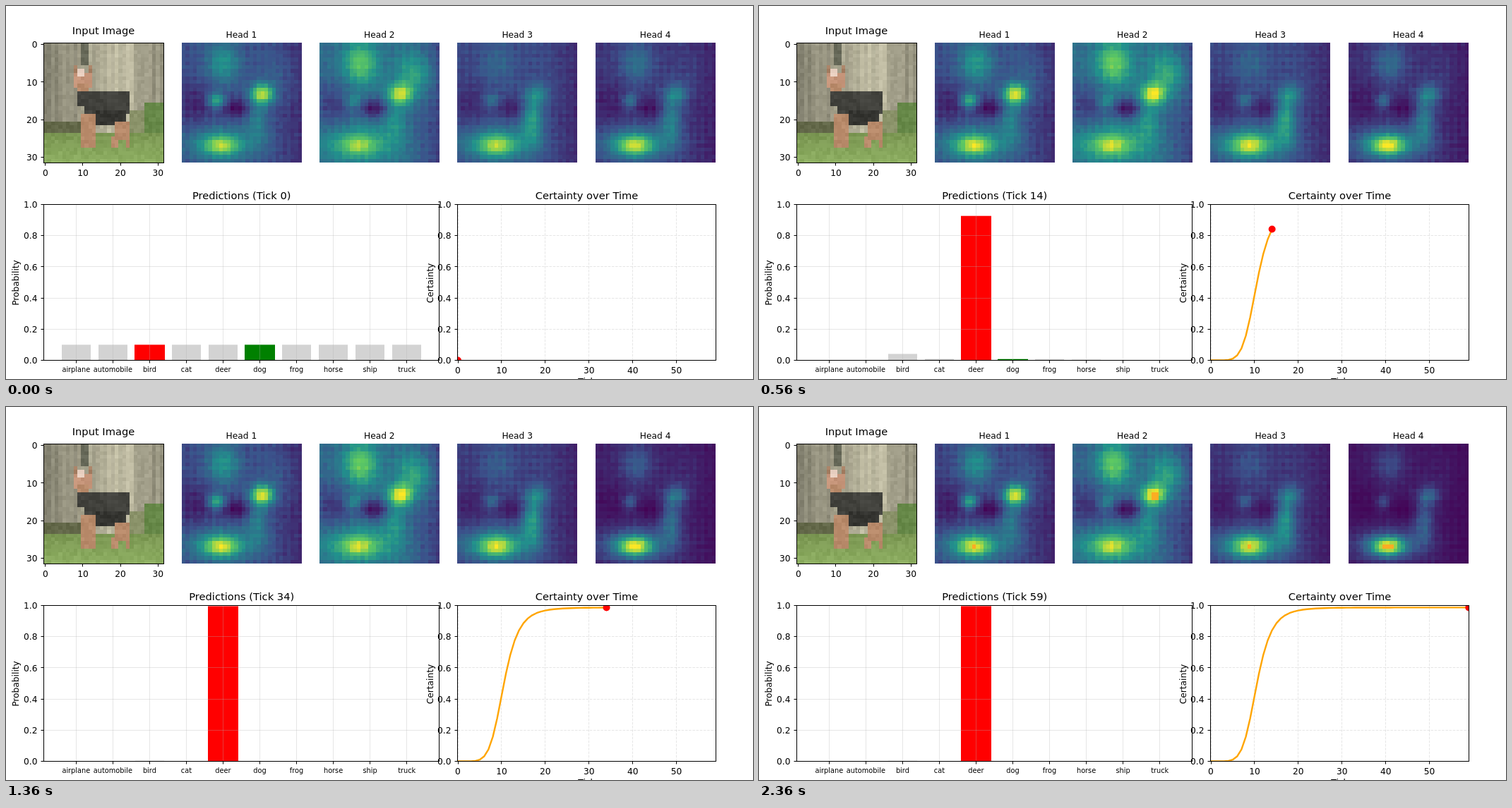
An HTML page with a canvas for the animation above (2400 ms loop, 1058x529 px).

```html
<!DOCTYPE html>
<html lang="en">
<head>
<meta charset="utf-8">
<title>Attention heads and certainty</title>
<style>
html, body { margin: 0; width: 100%; height: 100%; overflow: hidden; background: #fff; }
canvas { display: block; width: 100%; height: 100%; }
</style>
</head>
<body>
<canvas id="stage" width="1058" height="529"></canvas>
<script>
const ctx = document.getElementById('stage').getContext('2d');
const TICKS = 60, TICK_MS = 40, N = 32, CELL = 170 / N;
const PT = 1.2222;
const TOP = 281.5, BOTTOM = 502.5;
const GRID = 'rgba(176,176,176,.32)';

const clamp = (v, lo = 0, hi = 1) => Math.min(hi, Math.max(lo, v));
const mix = (a, b, k) => a + (b - a) * k;
const mixColor = (a, b, k) => a.map((c, i) => mix(c, b[i], k));
const css = rgb => `rgb(${rgb.map(Math.round)})`;
const bell = (d, spread) => Math.exp(-(d * d) / (2 * spread * spread));
const hash = (x, y, seed) => {
  const s = Math.sin(x * 127.1 + y * 311.7 + seed * 74.7) * 43758.5453;
  return s - Math.floor(s);
};
const range = n => Array.from({ length: n }, (_, i) => i);

// Certainty saturates along a Hill curve.
const certainty = t => {
  const odds = (t / 10.5) ** 6.1;
  return .987 * odds / (1 + odds);
};

// Probabilities: one set of logits, sharpened until the entropy fits the certainty.
const logits = {
  airplane: -.9, automobile: -1.15, bird: -.46, cat: -.68, deer: 0,
  dog: -.7, frog: -.72, horse: -.78, ship: -1.2, truck: -1.2
};
const classes = Object.keys(logits);
const truth = 'dog';

function softmax(sharpness) {
  const e = classes.map(name => Math.exp(logits[name] * sharpness));
  const sum = e.reduce((a, b) => a + b);
  return e.map(v => v / sum);
}
const entropy = p => -p.reduce((s, v) => s + (v > 0 ? v * Math.log(v) : 0), 0) / Math.log(p.length);
const probabilities = range(TICKS).map(t => {
  let lo = 0, hi = 40;
  for (let i = 0; i < 30; i++) {
    const mid = (lo + hi) / 2;
    if (1 - entropy(softmax(mid)) < certainty(t)) lo = mid; else hi = mid;
  }
  return softmax(lo);
});

const viridis = [[68, 1, 84], [59, 82, 139], [33, 145, 140], [94, 201, 98], [253, 231, 37]];
function colormap(v) {
  const k = clamp(v) * 4, i = Math.min(3, Math.floor(k));
  return mixColor(viridis[i], viridis[i + 1], k - i);
}

// Places in the picture that the heads share: centre x, y and spread x, y.
const landmarks = {
  crown: [10.5, 5, 3.2, 4],
  chest: [8.7, 15, 1.5, 1.4],
  rump: [21, 13.2, 2.1, 1.8],
  tail: [25, 8, 3.5, 4.5],
  hind: [19.5, 20, 2, 4.5],
  paws: [10, 27, 3, 1.8],
  ground: [10, 26.5, 7, 3.2],
  belly: [14, 17, 2.6, 1.8],
  fence: [3, 16, 3.5, 4]
};
const heads = [
  { base: .24, gamma: 1.17, crown: .27, chest: .4, rump: .62, tail: .08, hind: .17, paws: .4, ground: .28, belly: -.2, fence: -.13 },
  { base: .32, gamma: 1.17, crown: .36, chest: .15, rump: .48, tail: .25, hind: .13, paws: .25, ground: .25, belly: -.26, fence: -.15 },
  { base: .24, gamma: 1.28, crown: .12, chest: .2, rump: .22, tail: .02, hind: .35, paws: .4, ground: .38, belly: -.14, fence: -.1 },
  { base: .18, gamma: 1.6, crown: .22, chest: .25, rump: .26, tail: .05, hind: .28, paws: .5, ground: .36, belly: -.13, fence: -.08 }
];
heads.forEach((head, h) => {
  const raw = range(N * N).map(i => {
    const x = i % N, y = Math.floor(i / N);
    let v = head.base * (1 - .4 * clamp((x - 22) / 9));
    for (const [name, [cx, cy, sx, sy]] of Object.entries(landmarks))
      v += head[name] * bell(x - cx, sx) * bell(y - cy, sy);
    const lattice = Math.cos(Math.PI * x) + Math.cos(Math.PI * y);
    return Math.max(0, v + .012 * lattice + (hash(x, y, h) - .5) * .05);
  });
  const peak = Math.max(...raw);
  head.field = raw.map(v => v / peak);
});

function gridCanvas() {
  const c = document.createElement('canvas');
  c.width = c.height = N;
  return c;
}

// Input picture: planks, lawn and a small dark-backed animal, one unit per block.
function paintPicture() {
  const canvas = gridCanvas(), g = canvas.getContext('2d');
  const box = (x, y, w, h, rgb) => {
    g.fillStyle = css(rgb);
    g.fillRect(x, y, w, h);
  };
  const tan = [184, 138, 106], dark = [66, 66, 61], lawn = [122, 150, 82];
  for (const x of range(N)) {
    const shade = 142 + 50 * bell(x - 19, 6) + 24 * (hash(x, 0, 3) - .5);
    box(x, 0, 1, 24, [shade, shade * .98, shade * .85]);
  }
  box(10, 0, 2, 6, [104, 106, 90]);
  box(0, 21, 10, 3, [98, 103, 72]);
  box(23, 18, 4, 6, [138, 146, 105]);
  box(27, 16, 5, 8, [102, 136, 72]);
  for (let y = 24; y < N; y++) box(0, y, N, 1, mixColor(lawn, [142, 175, 98], (y - 24) / 7));
  for (const x of [8, 12]) box(x, 6, 1, 4, mixColor(tan, dark, .15));
  box(8, 8, 5, 4, [198, 149, 122]);
  box(9, 7, 2, 2, [230, 205, 190]);
  box(9, 11, 3, 3, tan);
  box(9, 13, 14, 4, dark);
  box(11, 16, 12, 3, dark);
  box(14, 18, 8, 4, mixColor(dark, [40, 40, 36], .5));
  box(10, 19, 4, 9, tan);
  box(19, 21, 4, 5, tan);
  box(18, 25, 2, 3, tan);
  box(22, 25, 1, 3, tan);
  const image = g.getImageData(0, 0, N, N);
  range(N * N).forEach(i => {
    const grain = (hash(i % N, Math.floor(i / N), 9) - .5) * 16;
    for (let j = 0; j < 3; j++) image.data[i * 4 + j] += grain;
  });
  g.putImageData(image, 0, 0);
  return canvas;
}
const picture = paintPicture();

const headCanvas = gridCanvas(), headCtx = headCanvas.getContext('2d');
function drawHead(head, left, tick) {
  const image = headCtx.createImageData(N, N);
  const gamma = mix(1, head.gamma, tick / (TICKS - 1));
  const peak = mix(.93, 1, clamp(tick / 5));
  head.field.forEach((v, i) => {
    const hot = tick >= 40 && v > .97;
    image.data.set([...(hot ? [252, 173, 35] : colormap(v ** gamma * peak)), 255], i * 4);
  });
  headCtx.putImageData(image, 0, 0);
  ctx.drawImage(headCanvas, left, 52, 170, 170);
}

function text(str, x, y, pt = 10, align = 'center') {
  ctx.font = `${pt * PT}px "DejaVu Sans", sans-serif`;
  ctx.textAlign = align;
  ctx.fillStyle = '#000';
  ctx.fillText(str, x, y);
}
function verticalText(str, x, y) {
  ctx.save();
  ctx.translate(x, y);
  ctx.rotate(-Math.PI / 2);
  text(str, 0, 0);
  ctx.restore();
}
const snap = v => Math.floor(v) + .5;
function line(x1, y1, x2, y2, color = '#000') {
  ctx.strokeStyle = color;
  ctx.lineWidth = 1;
  ctx.beginPath();
  ctx.moveTo(snap(x1), snap(y1));
  ctx.lineTo(snap(x2), snap(y2));
  ctx.stroke();
}
function frame(x, y, w, h) {
  ctx.strokeStyle = '#000';
  ctx.lineWidth = 1;
  ctx.strokeRect(x, y, w, h);
}
function xTick(x, y, label, pt = 10) {
  line(x, y, x, y + 4);
  text(label, x, y + 9.3 + pt * .92, pt);
}
function yTick(x, y, label) {
  line(x - 4, y, x, y);
  text(label, x - 9, y + 4.6, 10, 'right');
}

const plotY = v => BOTTOM - v * (BOTTOM - TOP);
const fifths = range(6).map(i => i / 5);
function plotGrid(left, right, xs, dash) {
  ctx.setLineDash(dash);
  xs.forEach(x => line(x, BOTTOM, x, TOP, GRID));
  fifths.forEach(v => line(left, plotY(v), right, plotY(v), GRID));
  ctx.setLineDash([]);
}
function plotFrame(left, right) {
  frame(left, TOP, right - left, BOTTOM - TOP);
  fifths.forEach(v => yTick(left, plotY(v), v.toFixed(1)));
}
function clipped(left, right, draw) {
  ctx.save();
  ctx.beginPath();
  ctx.rect(left, TOP, right - left, BOTTOM - TOP);
  ctx.clip();
  draw();
  ctx.restore();
}

function drawImages(tick) {
  ctx.imageSmoothingEnabled = false;
  ctx.drawImage(picture, 53, 52, 170, 170);
  frame(53.5, 52.5, 170, 170);
  for (let v = 0; v <= 30; v += 10) {
    xTick(53.2 + (v + .5) * CELL, 222.5, String(v));
    yTick(53.5, 52.2 + (v + .5) * CELL, String(v));
  }
  text('Input Image', 138, 40, 12);
  heads.forEach((head, i) => {
    const left = 249 + i * 195.4;
    drawHead(head, Math.floor(left), tick);
    text(`Head ${i + 1}`, left + 84.4, 45);
  });
}

function drawPredictions(tick) {
  const left = 53.5, right = 613.5, step = 52.04;
  const center = i => 99.6 + i * step;
  const guess = tick < 3 ? 'bird' : 'deer';
  clipped(left, right, () => probabilities[tick].forEach((p, i) => {
    const name = classes[i], edge = name === guess || name === truth ? 1 : 0;
    const x1 = Math.round(center(i) - step * .4) - edge;
    const x2 = Math.floor(center(i) + step * .4) + edge;
    ctx.fillStyle = name === guess ? '#ff0000' : name === truth ? '#008000' : '#d3d3d3';
    ctx.fillRect(x1, plotY(p), x2 - x1, BOTTOM - plotY(p));
  }));
  plotGrid(left, right, classes.map((_, i) => center(i)), []);
  plotFrame(left, right);
  classes.forEach((name, i) => xTick(center(i) - .3, BOTTOM, name, 8));
  verticalText('Probability', 17.8, 392.5);
  text(`Predictions (Tick ${tick})`, 333.7, 274, 12);
}

function drawCertainty(tick) {
  const left = 639.5, right = 1005.5;
  const plotX = t => 640 + t * (365.3 / (TICKS - 1));
  const marks = range(6).map(i => i * 10);
  plotGrid(left, right, marks.map(plotX), [3.6, 1.6]);
  clipped(left, right, () => {
    ctx.strokeStyle = '#ffa500';
    ctx.lineWidth = 2.4;
    ctx.lineJoin = 'round';
    ctx.beginPath();
    for (let t = 0; t <= tick; t++) ctx.lineTo(plotX(t), plotY(certainty(t)));
    ctx.stroke();
    ctx.fillStyle = '#ff0000';
    ctx.beginPath();
    ctx.arc(plotX(tick), plotY(certainty(tick)), 5, 0, Math.PI * 2);
    ctx.fill();
  });
  plotFrame(left, right);
  marks.forEach(t => xTick(plotX(t), BOTTOM, String(t)));
  verticalText('Certainty', 604.5, 393);
  text('Certainty over Time', 822.5, 274, 12);
  text('Tick', 822.5, 537);
}

function render(now) {
  const tick = Math.floor(Math.max(0, now - start) / TICK_MS) % TICKS;
  ctx.fillStyle = '#fff';
  ctx.fillRect(0, 0, 1058, 529);
  drawImages(tick);
  drawPredictions(tick);
  drawCertainty(tick);
  requestAnimationFrame(render);
}
const start = performance.now();
render(start);
</script>
</body>
</html>
```
